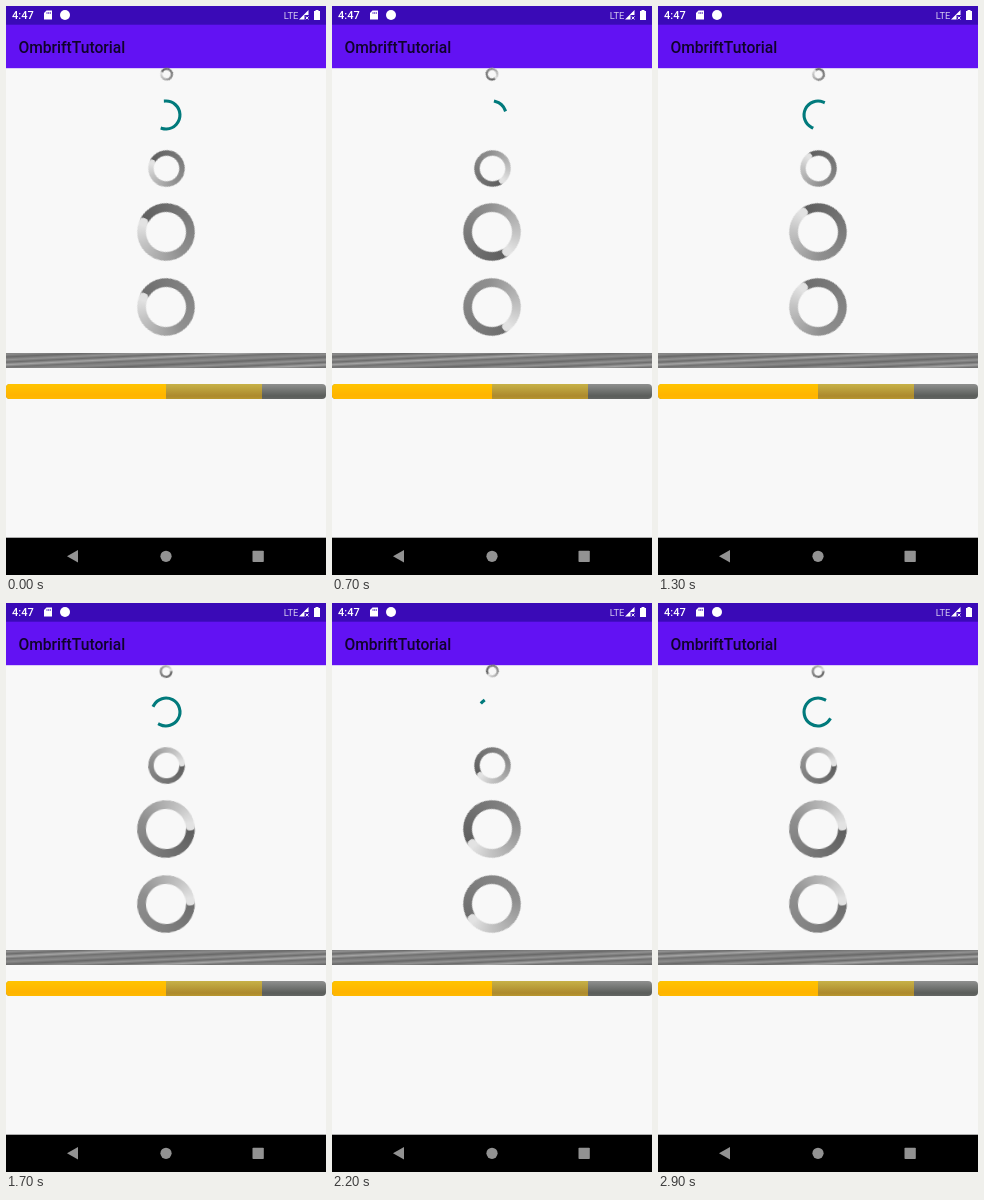
Write an HTML page that moves like this. It is 320 by 569 pixels and loops after 3000 ms.

```html
<!DOCTYPE html>
<html lang="en">
<head>
<meta charset="utf-8">
<title>Progress bars</title>
<style>
html, body { margin: 0; width: 100%; height: 100%; overflow: hidden; background: #f8f8f8; }
#stage { position: relative; width: 320px; height: 569px; overflow: hidden; }
svg { position: absolute; left: 0; top: 0; }
text { font-family: Roboto, sans-serif; font-weight: 500; }

.ring {
  --hole: .69;
  --dark: #5d5d5d;
  --mid: #757575;
  --r: calc(var(--d) / 2);
  position: absolute;
  left: calc(160px - var(--r));
  top: calc(var(--y) - var(--r));
  width: var(--d);
  height: var(--d);
  border-radius: 50%;
  background: conic-gradient(var(--dark), var(--mid) 28%, #8f8f8f 58%, #c4c4c4 86%, #e2e2e2 98%);
  -webkit-mask: radial-gradient(closest-side, transparent calc(100% * var(--hole) - .5px), #000 calc(100% * var(--hole) + .5px));
  mask: radial-gradient(closest-side, transparent calc(100% * var(--hole) - .5px), #000 calc(100% * var(--hole) + .5px));
  animation: spin 3s steps(30) infinite;
}
.ring::after {
  --cap: calc(var(--r) * (1 - var(--hole)));
  content: "";
  position: absolute;
  left: calc(50% - var(--cap) / 2);
  top: 0;
  width: var(--cap);
  height: var(--cap);
  border-radius: 50%;
  background: #e2e2e2;
}
@keyframes spin {
  from { transform: rotate(294deg); }
  to { transform: rotate(1194deg); }
}

.stripes { position: absolute; left: 0; top: 346.5px; width: 320px; height: 15.6px; overflow: hidden; }
.stripes::before {
  content: "";
  position: absolute;
  inset: 0 0 0 -320px;
  background: repeating-linear-gradient(177.21deg,
    #808080 0, #8a8a8a 1.5px, #696969 4px, #929292 6.8px, #6c6c6c 9.2px, #a4a4a4 11.7px, #707070 14px, #808080 15.58px);
  animation: slide .6s steps(3) infinite;
}
@keyframes slide { to { transform: translateX(320px); } }

.level { position: absolute; left: 0; top: 377.7px; width: 320px; height: 15.7px; border-radius: 4px; overflow: hidden;
  background: linear-gradient(#8f908f, #5a5d5a 80%, #646664); }
.level i { position: absolute; left: 0; top: 0; height: 100%; }
.second { width: 256px; background: linear-gradient(#ffd30080, #ffb60080 80%, #ffc00088); }
.first { width: 160px; background: linear-gradient(#ffc400, #ffb400 75%, #ffba00); }
</style>
</head>
<body>
<div id="stage">
  <svg width="320" height="569" viewBox="0 0 320 569">
    <rect width="320" height="62.2" fill="#6212f3"/>
    <rect width="320" height="18.7" fill="#3a0ab7"/>
    <rect y="531.7" width="320" height="38"/>

    <g fill="#fff">
      <text x="6" y="13.2" font-size="11">4:47</text>
      <path d="M40.5 4.5H46V13.5H38V7Z"/>
      <circle cx="59" cy="9" r="5"/>
      <text x="277.8" y="12.6" font-size="9.3" style="font-weight:400" fill="#d8d0f0">LTE</text>
      <path d="M302.5 4V9H298.5V13.5H293Z"/>
      <path d="M299.7 10.5l2.800 2.800m0-2.800l-2.800 2.800" stroke="#fff"/>
      <path d="M309.5 5V4h3v1h1.500v9h-6V5Z"/>
    </g>
    <path d="M41 6v2m1.700-2v2m1.600-2v2" stroke="#3a0ab7" stroke-width=".7"/>
    <text x="12.5" y="46.7" font-size="15.6" fill="#10032c">OmbriftTutorial</text>

    <circle id="arc" cx="160" cy="109" r="13.95" fill="none" stroke="#017a7c" stroke-width="3.1"
      stroke-linecap="square" pathLength="360"/>

    <g fill="#929292">
      <path d="M61 550.300L72 544V556.600Z"/>
      <circle cx="160" cy="550.3" r="5.6"/>
      <rect x="246.5" y="544.8" width="11.3" height="11.3" rx=".8"/>
    </g>
  </svg>

  <div class="ring" style="--d:12.6px;--y:68.5px;--hole:.64"></div>
  <div class="ring" style="--d:37px;--y:162px"></div>
  <div class="ring" style="--d:58px;--y:226px"></div>
  <div class="ring" style="--d:58px;--y:301px;--dark:#6c6c6c;--mid:#808080"></div>
  <div class="stripes"></div>
  <div class="level"><i class="second"></i><i class="first"></i></div>
</div>

<script>
const LOOP = 3000, STEP = 100, CYCLE = 1333, PHASE = 0.235;
const arc = document.getElementById('arc');

// cubic-bezier(.4, 0, .2, 1), clamped outside 0..1
function ease(x) {
  if (x <= 0) return 0;
  if (x >= 1) return 1;
  let lo = 0, hi = 1, s = 0.5;
  for (let i = 0; i < 24; i++) {
    const u = 1 - s;
    if (1.2 * s * u * u + 0.6 * s * s * u + s * s * s < x) lo = s; else hi = s;
    s = (lo + hi) / 2;
  }
  return s * s * (3 - 2 * s);
}

function draw() {
  const t = Math.floor(performance.now() % LOOP / STEP) * STEP;
  const p = (PHASE + t / CYCLE) % 1;
  const tail = 270 * ease(p * 2 - 1);
  const head = 270 * ease(p * 2);
  const turn = t * 720 / 4444 + 90 * p - 23.5;
  arc.setAttribute('stroke-dasharray', `${Math.max(head - tail, 0.01)} 720`);
  arc.setAttribute('transform', `rotate(${turn + tail - 90} 160 109)`);
  requestAnimationFrame(draw);
}
draw();
</script>
</body>
</html>
```
